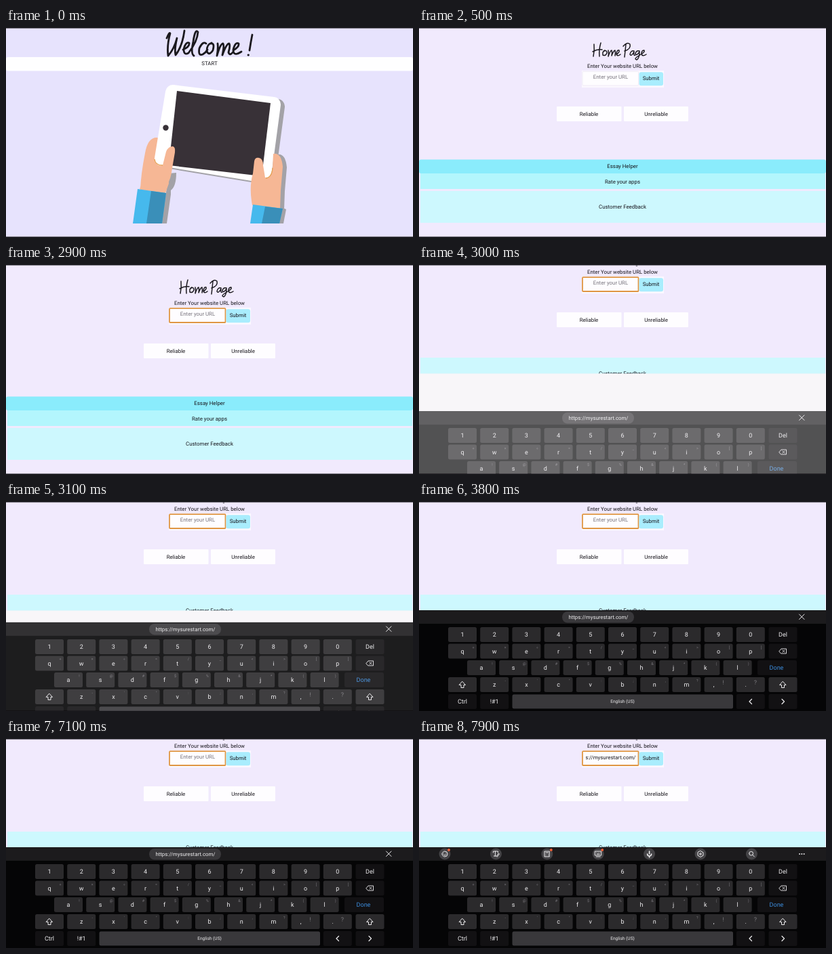
An HTML page for the animation above (8 s loop, 600x309 px).

```html
<!DOCTYPE html>
<html lang="en">
<head>
<meta charset="utf-8">
<title>App walkthrough</title>
<style>
html, body { margin: 0; height: 100%; overflow: hidden; }
svg { display: block; width: 600px; height: 309px; font: 7.85px Roboto, sans-serif; text-rendering: geometricPrecision; }
text { text-anchor: middle; fill: #17151b; }
.script { fill: none; stroke: #1b191e; stroke-linecap: round; stroke-linejoin: round; }
#keyboard text { fill: #eeedef; }
#keyboard .alt { fill: #79777c; font-size: 5.5px; }
#keyboard .done { fill: #3c8ddd; font-size: 9px; }
.icon { fill: none; stroke: #eeedef; stroke-linecap: round; stroke-linejoin: round; }
</style>
</head>
<body>
<svg viewBox="0 0 600 309">
  <defs>
    <clipPath id="field"><path d="M246 65H323V86H246Z"/></clipPath>
    <clipPath id="stage"><path d="M0 0H600V309H0Z"/></clipPath>
  </defs>
  <g id="welcome"></g>
  <g id="home"></g>
  <path d="M0 .5H600M0 308.5H600" stroke="#85818c"/>
  <g id="keyboard" clip-path="none"></g>
</svg>
<script>
const $ = id => document.getElementById(id);
const rect = (x, y, w, h, fill, r = 0) =>
  `<rect x="${x}" y="${y}" width="${w}" height="${h}" rx="${r}" fill="${fill}"/>`;
const text = (x, y, s, attrs = '') => `<text x="${x}" y="${y}" ${attrs}>${s}</text>`;
const path = (d, fill, attrs = '') => `<path d="${d}" fill="${fill}" ${attrs}/>`;
const icon = (d, width = 1) => `<path class="icon" d="${d}" stroke-width="${width}"/>`;
const script = (d, width) => `<path class="script" d="${d}" stroke-width="${width}"/>`;

// Welcome screen
const skin = '#f6b795', shade = '#a3a2a7', sleeve = '#46b9ed', cuff = '#3a8fb9', nail = '#e5a052';
const body = 'M246 95L394 113L380 218L230 193Z';
const outline = color => `stroke="${color}" stroke-width="22" stroke-linejoin="round"`;
const rightHand = 'M366 197Q367 191 373 192Q379 193 379 203L382 221Q391 223 393 205L394 186Q406 184 408 205L405 240L404 268L363 262Q358 235 364 215Z';
$('welcome').innerHTML =
  rect(0, 0, 600, 309, '#e7e3fd') +
  script('M237 15Q241 5 242 8Q237 26 239 41Q248 31 252 15Q248 32 250 40Q260 27 263 4' +
    'M261 32Q271 28 270 22Q265 20 262 31Q262 41 269 37Q282 20 283 6Q279 0 276 20Q272 38 277 41' +
    'M295 23Q290 19 285 30Q283 42 290 39Q295 36 297 32' +
    'M303 22Q296 24 296 34Q299 42 305 33Q308 22 302 23' +
    'M312 23Q313 30 311 41Q316 23 320 23Q322 26 319 40Q325 23 329 23Q331 26 328 36Q330 42 335 35' +
    'M335 33Q344 28 343 23Q338 20 335 32Q335 43 347 35M363 10Q361 20 359 33M357 40h.5', 2.8) +
  rect(0, 43, 600, 20.5, '#fefeff', 3) + text(300, 55, 'START') +
  path('M236 243L240 215L251 214Q251 234 243 240L243 246L237 289H228Z', shade) +
  path(rightHand, shade, 'transform="translate(6 1)"') +
  path('M408 266L413 268L409 289H402Z', shade) +
  path(body, shade, outline(shade) + ' transform="translate(6 3)"') +
  path('M198 239Q199 215 205 185Q209 162 222 162L236 165L240 230L235 244Z', skin) +
  path(body, '#fff', outline('#fff')) +
  path('M252 93L390 111L377 219L240 203Z', '#383137') +
  '<circle cx="235.5" cy="147.5" r="4.2" fill="#383137"/>' +
  path('M236 183Q239 175 246 175Q250 176 249 184L245 207Q243 225 237 232L234 244L197 238L212 200Q222 205 231 203Z', skin) +
  path(rightHand, skin) +
  path('M219 194Q220 203 231 203M383 222Q392 221 393 207', 'none', `stroke="${nail}" stroke-width="1.3"`) +
  path('M194 238L236 244L230 289H187Z M364 261L408 267L403 289H360Z', sleeve) +
  path('M214 241L236 244L230 289H207Z M382 264L408 267L403 289H377Z', cuff);

// Home screen
$('home').innerHTML =
  rect(0, 0, 600, 309, '#f1eafd') +
  '<g id="top">' +
  script('M258 24Q259 33 257 42M268 22Q265 32 266 42M256 35Q263 31 270 32' +
    'M274 33Q270 35 271 40Q275 42 277 37Q277 32 273 34' +
    'M279 33Q280 38 279 42Q282 33 284 33Q285 36 284 41Q287 33 289 33Q290 37 289 41' +
    'M291 39Q296 36 295 33Q292 32 291 38Q292 43 297 39' +
    'M305 24Q304 34 303 43M301 27Q307 20 311 24Q313 31 303 34' +
    'M317 34Q312 33 311 39Q313 43 317 35Q316 42 319 40' +
    'M325 34Q320 33 319 38Q321 42 325 35Q325 45 321 47Q317 46 321 43L327 39' +
    'M328 38Q333 36 332 33Q328 33 328 38Q329 43 335 39', 1.5) +
  text(300, 59.3, 'Enter Your website URL below') +
  rect(240, 63, 121, 25, '#fbf8ff') +
  '<rect id="input" x="241" y="64.2" width="82.5" height="20.8" rx="1" fill="#fefdff"/>' +
  text(282.5, 75, 'Enter your URL', 'id="hint" style="fill:#78747d"') +
  '<g clip-path="url(#field)">' +
  text(319.5, 75.5, 'https://mysurestart.com/', 'id="typed" style="text-anchor:end"') + '</g>' +
  '<path id="caret" d="M320.5 67V77" stroke="#222"/>' +
  rect(324.5, 65.3, 35.5, 20, '#a9edfd', 3) + text(342, 77.4, 'Submit') +
  rect(203, 116, 95.5, 22, '#fefdff', 1) + text(250.5, 129.6, 'Reliable') +
  rect(302, 116, 95, 22, '#fefdff', 1) + text(349.5, 129.6, 'Unreliable') +
  '</g><g id="links">' +
  rect(0, 194.5, 600, 20.5, '#8aecfc', 3) + text(300, 206.6, 'Essay Helper') +
  rect(2, 215, 597, 23, '#b3f6fd') + text(300, 229.6, 'Rate your apps') +
  '</g><g id="feedback">' +
  rect(2, 241, 597, 47, '#cdf8fe') + text(300, 267, 'Customer Feedback') +
  '</g><g id="gap">' + rect(0, 160.5, 600, 149, '#f8f6f9') + '</g>';

// Keyboard
const pitch = 47.2, dark = '#121113';
const key = (x, y, label = '', fill = '#2b2a2c') =>
  rect(x - 21, y - 11, 42, 22, fill, 2.5) + text(x, y + 3.2, label, 'font-size="9"');
const row = (x, y, labels, alts = '') => [...labels].map((c, i) =>
  key(x + i * pitch, y, c) +
  (alts ? text(x + 16 + i * pitch, y - 4, alts[i].replace('<', '&lt;').replace('&', alts[i] === '&' ? '&amp;' : '&'), 'class="alt"') : '')).join('');
const shift = x => icon(`M${x} 265.5L${x + 4.5} 270.5H${x + 2}V274.5H${x - 2}V270.5H${x - 4.5}Z`);
const tools = [
  'M-4 0A4 4 0 1 0 4 0A4 4 0 1 0 -4 0M-2 1Q0 3.5 2 1M-1.5 -1.2v.1M1.5 -1.2v.1',
  'M-4 -2V-4H3V-2M-1 -4V3M-3 3H0M1 3L4 -1L5 0L2 4Z',
  'M-3.5 -4H3.5V4H-3.5ZM-2 -2H2M-1.7 .5v.1M1.7 .5v.1M-1.7 2.4v.1M1.7 2.4v.1',
  'M-4.5 -4H4.5V2H-4.5ZM-2.5 -2h.1M0 -2h.1M2.5 -2h.1M-2 0H2M-3 4H3',
  'M0 -4V0M-3 0Q-3 3 0 3Q3 3 3 0M0 3V5',
  'M0 -4.5L4 -2.2V2.2L0 4.5L-4 2.2V-2.2ZM-1.3 0A1.3 1.3 0 1 0 1.3 0A1.3 1.3 0 1 0 -1.3 0',
  'M-3.7 -.8A2.9 2.9 0 1 0 2.1 -.8A2.9 2.9 0 1 0 -3.7 -.8M1.3 1.3L4 4'
];
const tool = (d, i) => `<g transform="translate(${38 + i * 75.4} 170)"><circle r="8.5" fill="#444346"/>` +
  icon(d, i === 4 ? 1.6 : 1) +
  ([0, 2, 3].includes(i) ? '<circle cx="6" cy="-6" r="2" fill="#ee6038"/>' : '') + '</g>';

$('keyboard').innerHTML =
  rect(0, 160, 600, 149, '#050506') + rect(0, 160, 600, 20, '#1c1b1d') +
  '<g id="suggestion">' + rect(211, 162, 106, 16.5, '#39383b', 8) +
  text(264.5, 172.8, 'https://mysurestart.com/') + icon('M560.5 166L568 173.5M568 166L560.5 173.5') + '</g>' +
  '<g id="tools">' + tools.map(tool).join('') +
  icon('M561 170h.1M564.3 170h.1M567.6 170h.1', 1.8) + '</g>' +
  row(64, 196, '1234567890') + key(536.5, 196, 'Del', dark) +
  row(64, 220.5, 'qwertyuiop', '+×÷=/_<>[]') + key(536.5, 220.5, '', dark) +
  icon('M531 220.5L534 217H541.5V224H534ZM536 219L539 222M539 219L536 222', .9) +
  row(92, 245, 'asdfghjkl', '!@#$%&*()') + rect(499, 234, 58, 22, dark, 2.5) +
  text(527, 248.2, 'Done', 'class="done"') +
  key(64, 270) + shift(64) + row(111.2, 270, 'zxcvbnm', '-\'":;,?') +
  [[441.6, ',', '!'], [488.8, '.', '?']].map(([x, c, alt]) => key(x, 270) +
    text(x - 7, 273, c, 'font-size="9"') + text(x + 7, 270, alt, 'style="fill:#79777c;font-size:9px"')).join('') +
  key(536.5, 270) + shift(536.5) +
  key(64, 295, 'Ctrl', dark) + key(111.2, 295, '!#1', dark) +
  rect(137.5, 284.5, 325.5, 21, '#39383b', 2.5) + text(300, 297.3, 'English (US)', 'font-size="6.6"') +
  key(488.8, 295, '', dark) + key(536.5, 295, '', dark) +
  icon('M490.5 291.5L487 295L490.5 298.5M535 291.5L538.5 295L535 298.5', 1.2);

const show = (id, on) => $(id).setAttribute('visibility', on ? 'inherit' : 'hidden');
const shiftY = (id, y) => $(id).setAttribute('transform', `translate(0 ${y})`);

function draw(now) {
  const t = Math.floor(now % 8000 / 100) * 100;
  const focused = t >= 2800, open = t >= 3000, filled = t >= 7300;
  $('home').setAttribute('opacity', Math.min(1, Math.max(0, (t - 100) / 300)));
  $('input').setAttribute('stroke', focused ? '#df9643' : '#ece6f3');
  $('input').setAttribute('stroke-width', focused ? 1.8 : .8);
  shiftY('top', open ? -46 : 0);
  shiftY('feedback', open ? -104 : 0);
  show('links', !open);
  show('gap', open);
  show('hint', !filled);
  show('typed', filled);
  show('caret', filled && t < 7800);
  show('suggestion', !filled);
  show('tools', filled);

  const hidden = t >= 3400 ? 0 : .32 ** ((t - 2900) / 100);
  show('keyboard', open);
  shiftY('keyboard', 175 * hidden);
  $('keyboard').setAttribute('opacity', 1 - hidden);
  requestAnimationFrame(draw);
}
draw(performance.now());
</script>
</body>
</html>
```
